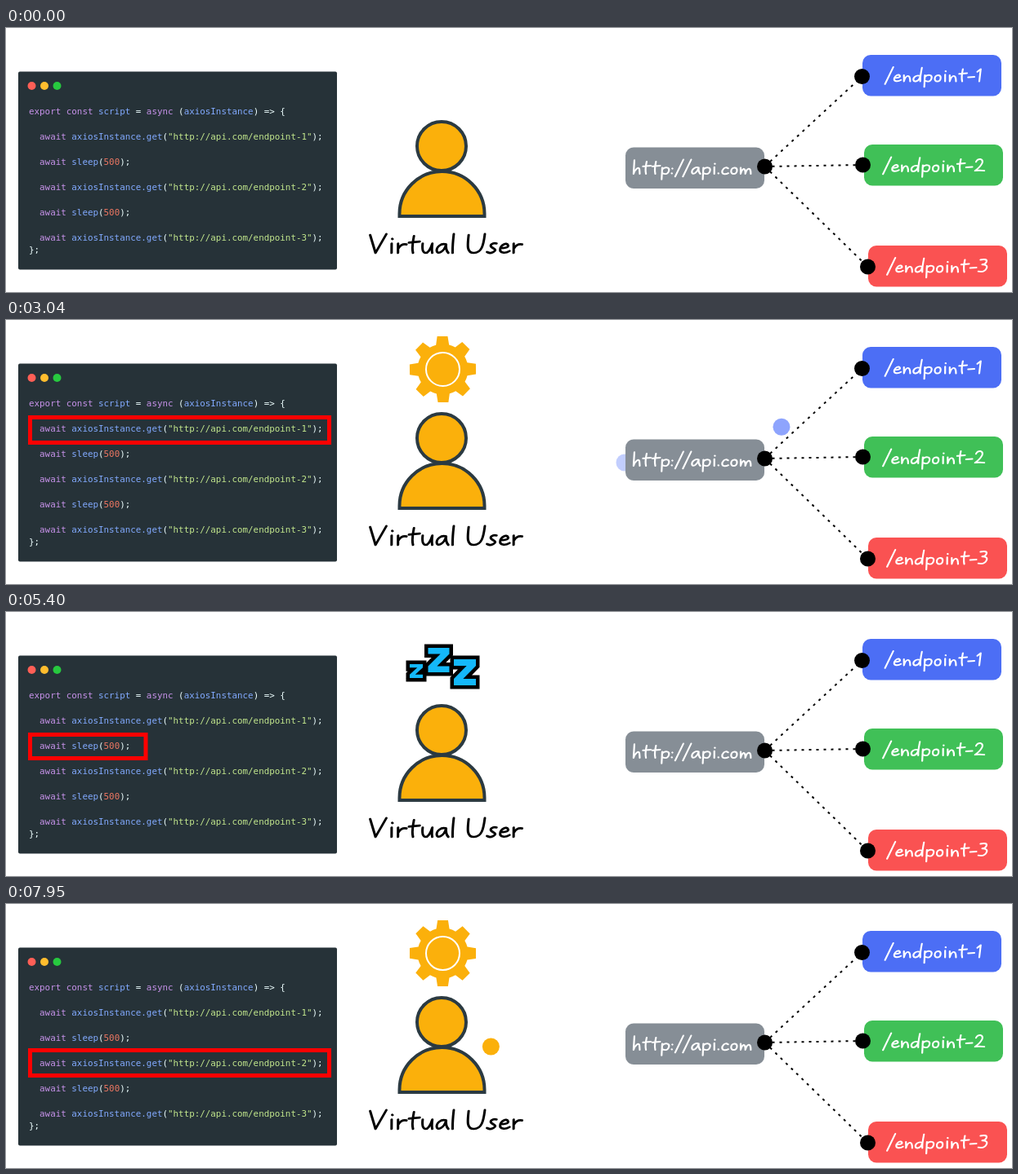
Animation, 1231 px wide and 324 px high, one loop 7990 ms. Source, as an HTML page:

```html
<!DOCTYPE html>
<html lang="en">
<head>
<meta charset="utf-8">
<title>Virtual user script</title>
<style>
  html, body { margin: 0; width: 100%; height: 100%; overflow: hidden; background: #fff; }
  svg { display: block; }
  .code text { font: 10.87px "DejaVu Sans Mono", "Liberation Mono", monospace; fill: #eff; white-space: pre; }
  .code .k { fill: #c792ea; }
  .code .f { fill: #82aaff; }
  .code .s { fill: #c3e88d; }
  .code .n { fill: #ee7762; }
  .hand path { fill: none; stroke-linecap: round; stroke-linejoin: round; }
  .hand text { font-family: "Open Sans", sans-serif; font-size: 22px; fill: transparent; }
  .mark rect { fill: none; stroke: #f00; stroke-width: 5; }
  .person { fill: #fbb00b; stroke: #2b3a42; stroke-width: 4; }
  .links { stroke: #000; stroke-width: 2; stroke-dasharray: 3 6; }
  .zzz path { fill: #14b8fa; stroke: #000; stroke-width: 9; paint-order: stroke; }
</style>
</head>
<body>
<svg id="stage" width="1231" height="324" viewBox="0 0 1231 324">
  <rect x="15" y="53.5" width="390" height="243" rx="2" fill="#263238"/>
  <circle cx="31.5" cy="71" r="5" fill="#ff5f56"/>
  <circle cx="47" cy="71" r="5" fill="#ffbd2e"/>
  <circle cx="62.5" cy="71" r="5" fill="#27c93f"/>
  <g id="code" class="code"></g>
  <g class="mark">
    <rect id="mark1" x="29.5" y="119.5" width="366" height="31"/>
    <rect id="markSleep" x="29.5" y="150.5" width="141.5" height="29"/>
    <rect id="mark2" x="29.5" y="179.5" width="366" height="31"/>
  </g>
  <g id="under"></g>
  <g class="person">
    <circle cx="533" cy="145" r="30"/>
    <path d="M481.5 231V228A52 52 0 0 1 585.5 228V231Z"/>
  </g>
  <g id="gear">
    <path id="cog" fill="#fbb00b"/>
    <circle r="20.5" fill="none" stroke="#fff" stroke-width="2"/>
  </g>
  <g id="zzz" class="zzz"></g>
  <g id="boxes"></g>
  <g class="links">
    <path d="M928.5 170L1047.5 59.5"/>
    <path d="M928.5 170L1048.5 168"/>
    <path d="M928.5 170L1054.5 293"/>
  </g>
  <g id="joints"></g>
  <g id="over"></g>
  <g id="labels" class="hand"></g>
</svg>
<script>
const LOOP = 7990;
const $ = id => document.getElementById(id);

function add(parent, tag, attrs, text) {
  const el = document.createElementNS("http://www.w3.org/2000/svg", tag);
  for (const key in attrs) el.setAttribute(key, attrs[key]);
  if (text) el.textContent = text;
  return parent.appendChild(el);
}

// Code listing: [style, text] runs for each row.
function addRow(row, ...runs) {
  const line = add($("code"), "text", { x: 28, y: 105.5 + row * 15.53 });
  for (const [style, text] of runs) add(line, "tspan", { class: style }, text);
}
const getRow = (row, n) => addRow(row, ["k", "  await "], ["f", "axiosInstance.get"], ["", "("],
  ["s", `"http://api.com/endpoint-${n}"`], ["", ");"]);
const sleepRow = row => addRow(row, ["k", "  await "], ["f", "sleep"], ["", "("], ["n", "500"], ["", ");"]);

addRow(0, ["k", "export const "], ["f", "script"], ["", " = "], ["k", "async "], ["", "("],
  ["f", "axiosInstance"], ["", ") => {"]);
getRow(2, 1);
sleepRow(4);
getRow(6, 2);
sleepRow(8);
getRow(10, 3);
addRow(11, ["", "};"]);

// Pen strokes for the handwriting: [advance, path], baseline at 0.
const tall = {
  V: [19, "M0-19L7 0L15-20"],
  U: [20, "M1-19C1-8 1 0 8 0S16-8 16-20"],
  t: [12, "M4-18Q3-6 5 0M0-11L10-12"],
  l: [6, "M1-20Q1-8 2 0"],
  h: [13, "M1-20L2 0C3-7 8-12 9-6L10 0"],
  d: [14, "M9-8C3-10 0-5 1-2S8 1 9-6M10-20Q9-6 10 0"],
  p: [13, "M1-9L2 8M1-6C4-11 11-10 10-4S4 0 2-1"]
};
const small = {
  i: [7, "M2-10L3 0M2-15l.4.4"],
  r: [11, "M1-10L2 0M2-5Q4-10 9-9"],
  u: [14, "M1-10C1-2 3 0 5 0S9-4 10-10Q10-3 11 0"],
  a: [14, "M9-9C4-11 0-6 1-2S8-1 9-9Q9-3 12 0"],
  s: [11, "M8-10C4-11 1-8 4-6S9-3 6-1 2 0 0-1"],
  e: [12, "M1-5Q9-5 8-8C6-12 1-8 1-4S6 1 10-2"],
  c: [11, "M8-8C3-12 0-5 1-2S6 1 9-1"],
  o: [12, "M5-9C0-9 0 0 5 0S10-9 5-9"],
  m: [18, "M1-9L2 0C3-8 7-11 8 0C9-9 14-11 15 0"],
  n: [13, "M1-9L2 0C3-9 9-12 10 0"]
};
const signs = {
  " ": [8, ""],
  ":": [6, "M1-8l.4.4M1-1l.4.4"],
  ".": [5, "M1-1l.4.4"],
  "/": [10, "M0 4L8-21"],
  "-": [11, "M0-6L8-6.5"],
  1: [8, "M0-14L4-18L4 0"],
  2: [13, "M1-14C2-20 11-19 9-12Q7-6 1-1Q6-2 13-1"],
  3: [12, "M1-18Q10-20 9-15Q8-11 4-11Q12-11 10-5Q8 1 0-1"]
};
const pen = { ...tall, ...small, ...signs };

// The hand is low and leans slightly to the right.
function write(text, x, y, scale, color) {
  const g = add($("labels"), "g", {
    transform: `translate(${x} ${y}) scale(${scale} ${scale * 0.88}) skewX(-6)`,
    stroke: color, "stroke-width": 2.3
  });
  let at = 0;
  for (const ch of text) {
    const [advance, d] = pen[ch];
    if (d) add(g, "path", { d, transform: `translate(${at})` });
    at += advance;
  }
  add(g, "text", { stroke: "none" }, text); // selectable layer
}

function addBox(x, y, fill, text, tx, ty) {
  add($("boxes"), "rect", { x, y, width: 170, height: 50.5, rx: 10, fill });
  write(text, tx, ty, 0.95, "#fff");
}
addBox(758, 146.5, "#868e96", "http://api.com", 766, 179);
addBox(1048, 33, "#4c6ef5", "/endpoint-1", 1076, 65.5);
addBox(1050, 143, "#40c057", "/endpoint-2", 1073.5, 176);
addBox(1055, 267, "#fa5252", "/endpoint-3", 1078.5, 299.5);
write("Virtual User", 443, 276, 1.31, "#000");

for (const [cx, cy] of [[928.5, 170], [1047.5, 59.5], [1048.5, 168], [1054.5, 293]])
  add($("joints"), "circle", { cx, cy, r: 9.5 });

// Gear with eight tapered teeth.
const polar = (r, deg) => {
  const a = deg * Math.PI / 180;
  return `${(r * Math.sin(a)).toFixed(2)} ${(-r * Math.cos(a)).toFixed(2)}`;
};
let cog = "";
for (let i = 0; i < 8; i++) {
  const a = i * 45;
  cog += `${i ? "L" : "M"}${polar(31, a - 15)}L${polar(41, a - 9)}L${polar(41, a + 9)}L${polar(31, a + 15)}`
    + `A31 31 0 0 1 ${polar(31, a + 30)}`;
}
$("cog").setAttribute("d", cog + "Z");

function addZ(x, y, w, h) {
  const t = h * 0.25, k = w * 0.42;
  add($("zzz"), "path", {
    d: `M${x} ${y}h${w}v${t}L${x + k} ${y + h - t}H${x + w}v${t}h${-w}v${-t}L${x + w - k} ${y + t}H${x}Z`
  });
}
addZ(494, 64, 16, 17);
addZ(516.5, 44, 26, 30);
addZ(548, 58, 27, 32);

// Motion
const clamp = v => Math.min(1, Math.max(0, v));
const ramp = (t, from, to) => clamp((t - from) / (to - from));
const ease = u => u < 0.5 ? 2 * u * u : 1 - 2 * (1 - u) * (1 - u);
const fade = (t, [in0, in1, out0, out1]) => ramp(t, in0, in1) * (1 - ramp(t, out0, out1));

const FIRST = [20, 500, 4400, 4900];
const SLEEP = [4900, 5400, 6900, 7400];
const SECOND = [7400, 7900, LOOP, LOOP + 1];
const SPIN_DELAY = 550, SPIN_SPEED = 0.072; // ms, degrees per ms
const YELLOW = "#fbb00b", BLUE = "#748ffc";

const dots = [
  { on: "under", color: YELLOW, a: [592.5, 175], b: [757, 175], move: [500, 1500], show: [20, 500, 1100, 1500] },
  { on: "over", color: YELLOW, a: [920, 181], b: [1049, 60], move: [1400, 2400], show: [1200, 1500, 2340, 2740] },
  { on: "over", color: BLUE, a: [1036, 50], b: [930, 149], move: [2340, 3340], show: [2340, 2640, 2960, 3400] },
  { on: "under", color: BLUE, a: [757, 175], b: [589, 175], move: [3400, 4400], show: [2840, 3300, 3880, 4400] },
  { on: "under", color: YELLOW, a: [592.5, 175], b: [757, 175], move: [7900, 8900], show: SECOND }
];
for (const dot of dots) dot.el = add($(dot.on), "circle", { r: 10.5, fill: dot.color });

function draw(t) {
  const first = fade(t, FIRST), sleep = fade(t, SLEEP), second = fade(t, SECOND);
  $("mark1").style.opacity = first;
  $("markSleep").style.opacity = $("zzz").style.opacity = sleep;
  $("mark2").style.opacity = second;

  const since = t < SECOND[0] ? t : t - SECOND[0];
  const angle = SPIN_SPEED * Math.max(0, since - SPIN_DELAY);
  $("gear").style.opacity = first + second;
  $("gear").setAttribute("transform", `translate(534.5 60.5) rotate(${angle})`);

  for (const { el, a, b, move, show } of dots) {
    const p = ease(ramp(t, ...move));
    el.setAttribute("cx", a[0] + (b[0] - a[0]) * p);
    el.setAttribute("cy", a[1] + (b[1] - a[1]) * p);
    el.style.opacity = fade(t, show);
  }
}

const start = performance.now();
function tick() {
  draw((performance.now() - start) % LOOP);
  requestAnimationFrame(tick);
}
tick();
</script>
</body>
</html>
```
